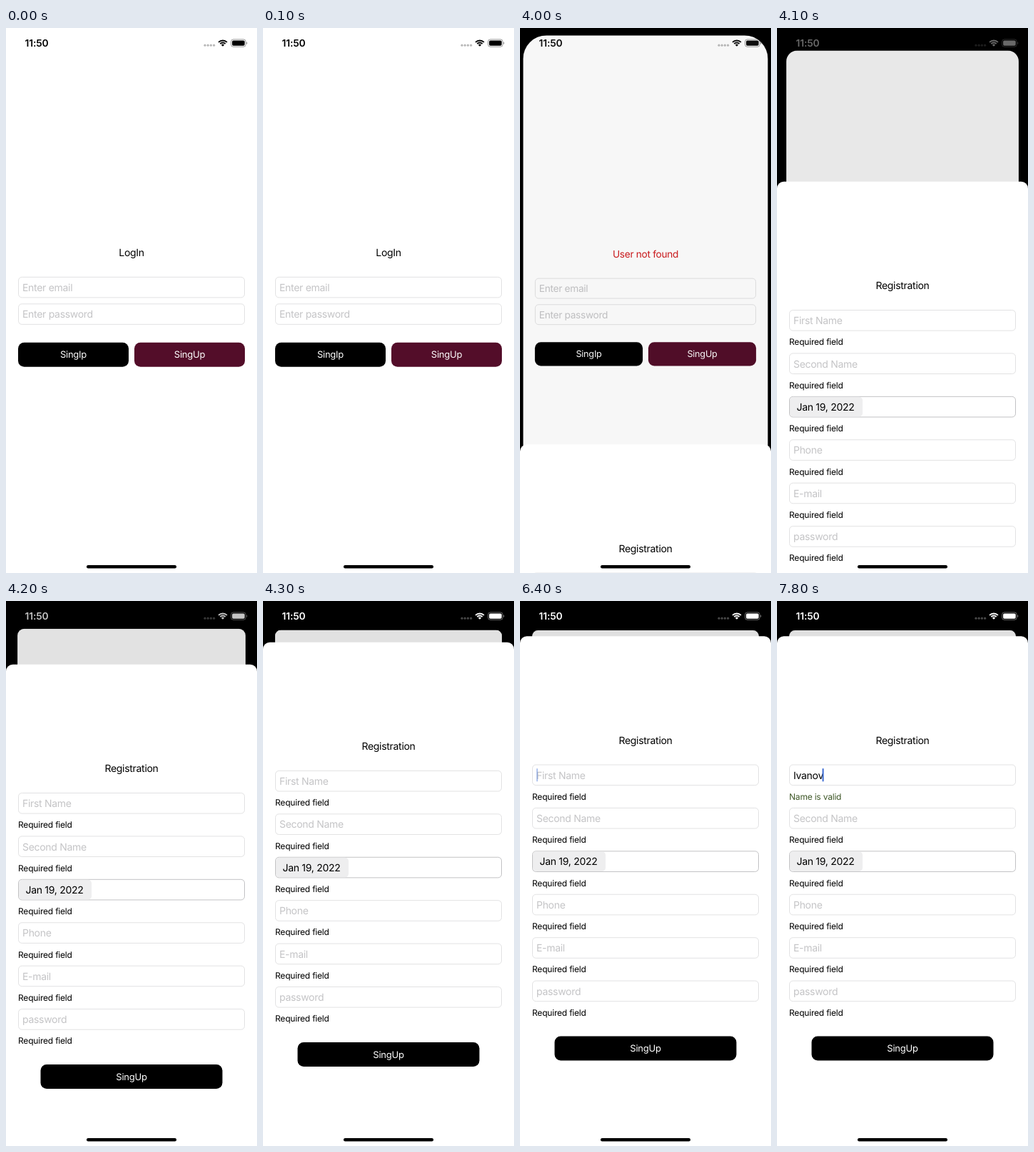
Recreate the animation shown at these times as an HTML page. Size 352x762 px, loop 8 s.

```html
<!DOCTYPE html>
<html lang="en">
<head>
<meta charset="utf-8">
<title>Sign-up form</title>
<style>
  html, body { margin: 0; width: 100%; height: 100%; overflow: hidden; background: #000; }
  svg { display: block; }
  text { font-family: Inter, "Liberation Sans", sans-serif; text-rendering: geometricPrecision; white-space: pre; }
  .body { font-size: 14px; letter-spacing: -.3px; }
  .note { font-size: 12px; letter-spacing: -.2px; }
  .btn { font-size: 13px; letter-spacing: -.25px; fill: #fff; }
  .clock { font-size: 13.8px; font-weight: 600; letter-spacing: -.1px; }
  .mid { text-anchor: middle; }
  .hint { fill: #c4c4c6; }
  .field { fill: #fff; stroke: #e2e2e3; }
  .date { stroke: #c2c2c4; }
</style>
</head>
<body>
<svg id="stage" width="352" height="762" viewBox="0 0 352 762"></svg>
<script>
const LOOP = 8000, STEP = 100;
const OPEN = 3947;      // sheet starts to rise
const STIFF = 0.01826;  // critically damped spring, per ms
const TRAVEL = 713;

// [time, text typed so far]
const TYPING = [[0, ''], [6500, 'I'], [6800, 'Iv'], [6900, 'Iva'], [7200, 'Ivan'], [7400, 'Ivano'], [7800, 'Ivanov']];
// [time, caret opacity]
const CARET = [[0, 0], [5500, .5], [5600, 1], [6100, .5], [6200, 0], [6400, .4], [6500, 1]];

const text = (x, y, cls, str, extra = '') => `<text x="${x}" y="${y}" class="${cls}" ${extra}>${str}</text>`;
const field = (y, cls = '') => `<rect class="field ${cls}" x="17.5" y="${y}" width="317" height="28.6" rx="4.8"/>`;
const button = (x, y, w, color, label) =>
  `<rect x="${x}" y="${y}" width="${w}" height="34" rx="8.5" fill="${color}"/>` +
  text(x + w / 2, y + 21.7, 'btn mid', label);

const login =
  text(176, 318.5, 'body mid', 'LogIn', 'id="title"') +
  ['Enter email', 'Enter password'].map((hint, i) => {
    const y = 348.3 + i * 37.5;
    return field(y) + text(23, y + 19.3, 'body hint', hint);
  }).join('') +
  button(17, 439.7, 155, '#000', 'SingIp') +
  button(180, 439.7, 155, '#530d29', 'SingUp');

const rows = ['First Name', 'Second Name', 'Jan 19, 2022', 'Phone', 'E-mail', 'password'].map((label, i) => {
  const y = 229 + i * 60.42, isDate = i === 2;
  const content = isDate
    ? `<rect x="18" y="${y + .5}" width="102" height="27.6" rx="5" fill="#eeeeef"/>` + text(27.5, y + 19.6, 'body', label)
    : text(23, y + 19.6, 'body hint', label, i ? '' : 'id="first"');
  return field(y, isDate ? 'date' : '') + content +
    text(17, y + 48.8, 'note', 'Required field', i ? '' : 'id="check"');
}).join('');

const sheet =
  '<rect y="49.3" width="352" height="800" rx="9.5" fill="#fff"/>' +
  text(176, 199.6, 'body mid', 'Registration') + rows +
  button(48.5, 608.5, 255, '#000', 'SingUp') +
  '<rect id="caret" y="234" width="2" height="18.5" rx="1" fill="#3b6bd3"/>';

const arc = r => {
  const d = r * Math.SQRT1_2;
  return `M${304 - d} ${25.8 - d}A${r} ${r} 0 0 1 ${304 + d} ${25.8 - d}`;
};
const status =
  text(26.5, 26, 'clock', '11:50') +
  [279, 283.2, 287.4, 291.6].map(x => `<circle cx="${x}" cy="24.2" r="1.6" opacity=".28"/>`).join('') +
  `<path d="${arc(8.4)}${arc(5.2)}" fill="none" stroke="currentColor" stroke-width="2"/>` +
  `<path d="${arc(3)}L304 25.8Z"/>` +
  '<rect x="315.6" y="15.9" width="20.6" height="10.4" rx="3.2" fill="none" stroke="currentColor" opacity=".4"/>' +
  '<rect x="317.1" y="17.4" width="17.6" height="7.4" rx="1.8"/>' +
  '<path d="M337.2 19.4q1.3.5 1.3 1.7t-1.3 1.7z" opacity=".45"/>';

document.getElementById('stage').innerHTML = `
  <clipPath id="round"><rect id="corner" width="352" height="762"/></clipPath>
  <g id="card" clip-path="url(#round)">
    <rect width="352" height="762" fill="#fff"/>${login}
    <rect id="dim" width="352" height="762"/>
  </g>
  <g id="sheet">${sheet}</g>
  <g id="status" fill="currentColor">${status}</g>
  <rect x="113" y="751" width="126" height="4.4" rx="2.2"/>`;

const el = {};
for (const id of ['title', 'first', 'check', 'caret', 'corner', 'card', 'dim', 'sheet', 'status'])
  el[id] = document.getElementById(id);

const at = (table, t) => table.filter(([start]) => start <= t).pop()[1];
const set = (node, attrs) => { for (const k in attrs) node.setAttribute(k, attrs[k]); };

function progress(t) {
  if (t < OPEN) return 0;
  if (t >= 4500) return 1;
  const s = STIFF * (t - OPEN);
  return 1 - (1 + s) * Math.exp(-s);
}

function draw(t) {
  const p = progress(t);
  const failed = t >= 3000;
  el.title.textContent = failed ? 'User not found' : 'LogIn';
  set(el.title, { fill: failed ? '#cf1a1d' : '#000' });

  set(el.card, { transform: `translate(${17 * p} ${41 * p}) scale(${1 - 34 / 352 * p})` });
  set(el.corner, { rx: p ? 42 - 33 * p : 0 });
  set(el.dim, { opacity: .12 * p });
  set(el.sheet, { transform: `translate(0 ${TRAVEL * (1 - p)})` });

  const light = Math.round(255 * Math.min(1, Math.max(0, (t - 3985) / 280)));
  set(el.status, { color: `rgb(${light},${light},${light})` });

  const typed = at(TYPING, t);
  el.first.textContent = typed || 'First Name';
  set(el.first, { class: typed ? 'body' : 'body hint' });
  el.check.textContent = typed ? 'Name is valid' : 'Required field';
  set(el.check, { fill: typed ? '#40592a' : '#000' });
  set(el.caret, {
    x: typed ? 22 + el.first.getComputedTextLength() - .4 : 23,
    opacity: at(CARET, t)
  });
}

let last = -1;
function tick() {
  const t = Math.floor(performance.now() % LOOP / STEP) * STEP;
  if (t !== last) draw(last = t);
  requestAnimationFrame(tick);
}
tick();
</script>
</body>
</html>
```
